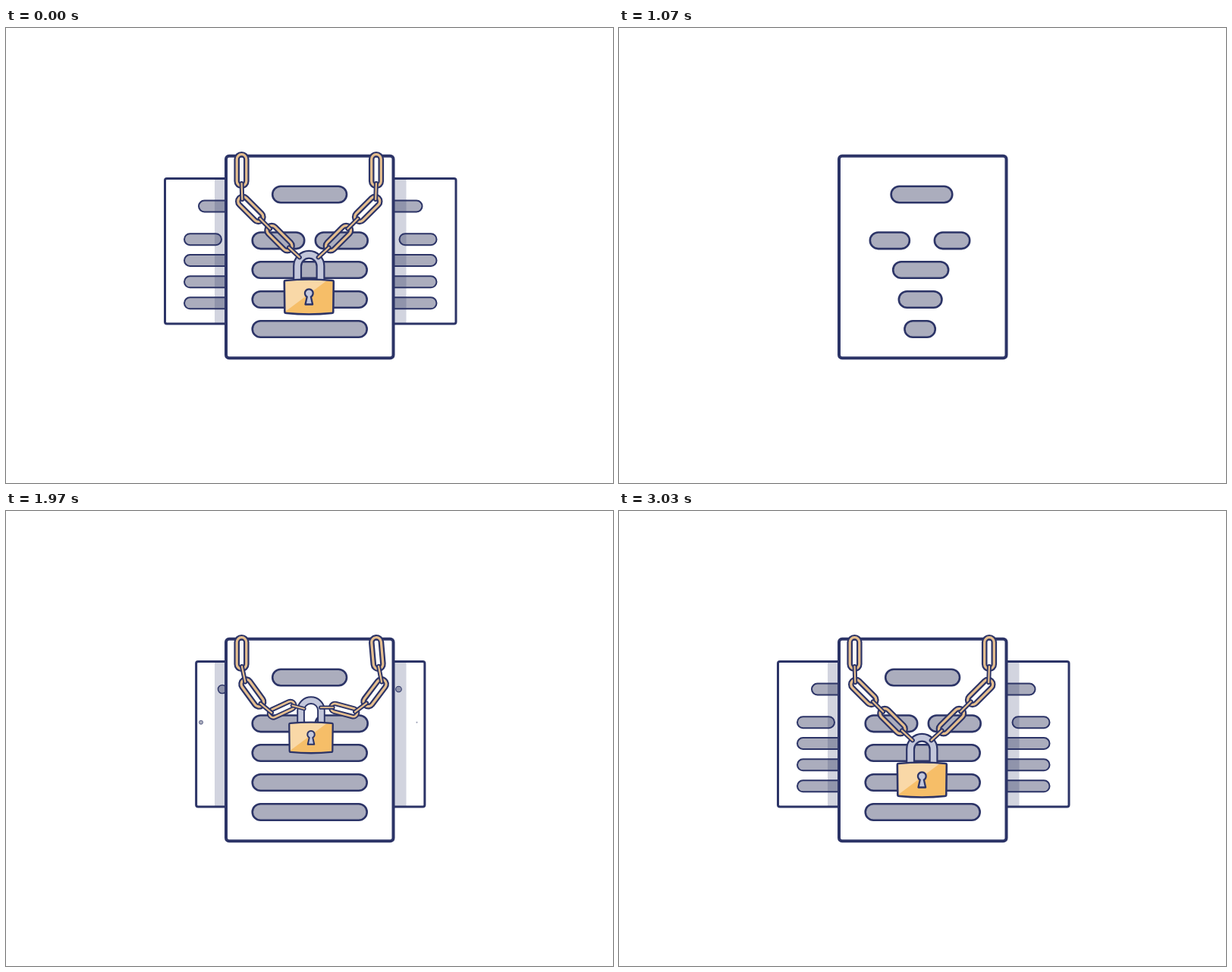
Recreate the animation shown at these times as an HTML page with a canvas. Size 800 by 600 pixels, loop 3530 ms.

```html
<!DOCTYPE html>
<html lang="en">
<head>
<meta charset="utf-8">
<title>Locked documents</title>
<style>
  html, body { margin: 0; width: 100%; height: 100%; overflow: hidden; background: #fff; }
  canvas { display: block; }
</style>
</head>
<body>
<canvas id="stage" width="800" height="600"></canvas>
<script>
const ctx = document.getElementById('stage').getContext('2d');
const LOOP = 3530;
const NAVY = '#2c3467', GREY = '#abadbd', GOLD = '#e5be8e', STEEL = '#c3c7db';

const clamp = v => Math.max(0, Math.min(1, v));
const part = (t, start, span) => clamp((t - start) / span);
const mix = (a, b, p) => a + (b - a) * p;
const smooth = p => (1 - Math.cos(Math.PI * p)) / 2;

function at(x, y, angle, scale, draw) {
  ctx.save();
  ctx.translate(x, y);
  ctx.rotate(angle * Math.PI / 180);
  ctx.scale(scale, scale);
  draw();
  ctx.restore();
}

function box(x0, y0, x1, y1, radius, fill, line) {
  ctx.beginPath();
  ctx.roundRect(x0, y0, x1 - x0, y1 - y0, radius);
  ctx.fillStyle = fill;
  ctx.fill();
  ctx.strokeStyle = NAVY;
  ctx.lineWidth = line;
  ctx.stroke();
}

// A dot pops up at c, then stretches to x0..x1.
function bar(t, x0, x1, y, c, r, line, start, popTime, growTime) {
  const pop = part(t, start - popTime, popTime);
  const p = part(t, start, growTime);
  if (!pop) return;
  at(c, y, 0, pop, () =>
    box(mix(-r, x0 - c, p), -r, mix(r, x1 - c, p), r, r, GREY, line));
}

function mainPage(t) {
  const pop = part(t, 50, 100);
  const tall = part(t, 150, 320);
  const wide = part(t, 470, 420);
  if (!pop) return;
  at(402.2, 302, 0, pop, () =>
    box(mix(-9, -112.2, wide), mix(-9, -133.3, tall),
        mix(9, 108.3, wide), mix(9, 133.2, tall), 4, '#fff', 4));
  const rows = [
    [351.2, 449, 219.5, 395],
    [324.7, 393.2, 280.3, 353],
    [407.8, 476.7, 280.3, 435.5],
    [324.7, 475.7, 319, 396],
    [324.7, 475.7, 358, 396],
    [324.7, 475.7, 397, 396]
  ];
  rows.forEach(([x0, x1, y, c], i) =>
    bar(t, x0, x1, y, c, 10.8, 2.6, 868 + i * 33, 80, 262));
}

function sidePage(t, delay, dotX) {
  const p = part(t, 1737, 485);
  if (!p) return;
  const left = mix(289, 209.5, p);
  box(left, 198.5, 320, 390, 2.5, '#fff', 3);
  const rows = [
    [254, 320, 235, 285],
    [235, 284, 278.7, dotX],
    [235, 320, 306.5, 286],
    [235, 320, 334.8, 286],
    [235, 320, 362.8, 286]
  ];
  rows.forEach(([x0, x1, y, c], i) =>
    bar(t, x0, x1, y, c, 7.5, 2, 2005 + delay + i * 52, 130, 440));
  const edge = Math.max(275, left);
  ctx.fillStyle = 'rgba(44,52,103,.21)';
  ctx.fillRect(edge, 198.5, 300 - edge, 191.5);
}

function mirrored(draw) {
  ctx.save();
  ctx.translate(802.5, 0);
  ctx.scale(-1, 1);
  draw();
  ctx.restore();
}

// Link angles from the anchor down, then the lock's x, y and tilt.
const RAISED = {
  left: [90, 78, 54, 40, -25, 15],
  right: [85, 79, 127, 143, 195, 180],
  lock: [402, 244.5, 0]
};
const REST = {
  left: [90, 88, 45, 45, 45, 43],
  right: [90, 92, 135, 135, 135, 137],
  lock: [399.3, 293, 0]
};
const SWUNG = {
  left: [90, 88, 45, 67, 45, 14],
  right: [90, 92, 135, 140, 138, 154],
  lock: [389, 282.7, -13.5]
};
const SWING = [[2150, 0], [2300, -.7], [2470, 1], [2640, -.5], [2800, .25], [2920, -.1], [3030, 0]];
const LENGTHS = [31, 25, 31, 23, 31, 23];
const STARTS = [1440, 1510, 1580, 1650, 1748, 1748];

function blend(a, b, p) {
  const out = {};
  for (const key in a) out[key] = a[key].map((v, i) => mix(v, b[key][i], p));
  return out;
}

function pose(t) {
  if (t < 2150) return blend(RAISED, REST, part(t, 1970, 180) ** 2);
  const i = SWING.findIndex(k => k[0] > t);
  if (i < 0) return REST;
  const [t0, a] = SWING[i - 1], [t1, b] = SWING[i];
  return blend(REST, SWUNG, mix(a, b, smooth((t - t0) / (t1 - t0))));
}

function twoTone(outer, inner) {
  ctx.lineCap = 'round';
  ctx.strokeStyle = NAVY;
  ctx.lineWidth = outer;
  ctx.stroke();
  ctx.strokeStyle = GOLD;
  ctx.lineWidth = inner;
  ctx.stroke();
}

function chain(t, x, y, angles) {
  const parts = angles.map((angle, i) => {
    const scale = part(t, STARTS[i], 260);
    const piece = { x, y, angle, scale, len: LENGTHS[i] };
    const rad = angle * Math.PI / 180;
    x += Math.cos(rad) * piece.len * scale;
    y += Math.sin(rad) * piece.len * scale;
    return piece;
  });
  for (const odd of [0, 1]) {
    parts.forEach(({ x, y, angle, scale, len }, i) => {
      if (i % 2 !== odd || !scale) return;
      at(x, y, angle, scale, () => {
        ctx.beginPath();
        if (odd) {
          ctx.moveTo(2, 0);
          ctx.lineTo(len - 2, 0);
          twoTone(6, 2.2);
        } else {
          ctx.roundRect(-5.3, -6.3, 41.6, 12.6, 6.3);
          twoTone(7.6, 3.2);
        }
      });
    });
  }
}

function shackle() {
  ctx.beginPath();
  ctx.moveTo(-15.2, 42);
  ctx.lineTo(-15.2, 21);
  ctx.arc(0, 21, 15.2, Math.PI, 0);
  ctx.lineTo(15.2, 42);
  ctx.lineCap = 'butt';
  ctx.strokeStyle = NAVY;
  ctx.lineWidth = 12;
  ctx.stroke();
  ctx.strokeStyle = STEEL;
  ctx.lineWidth = 7.6;
  ctx.stroke();
}

function lockBody() {
  const body = new Path2D('M-31 40Q0 37 31 40Q32.5 40 32.5 42L32 81Q32 83 30 83Q0 86 -30 83Q-32 83 -32 81L-32.5 42Q-32.5 40 -31 40Z');
  ctx.fillStyle = '#f6be68';
  ctx.fill(body);
  ctx.save();
  ctx.clip(body);
  ctx.fillStyle = '#f9d8a7';
  ctx.fill(new Path2D('M-34 36H29L-34 83Z'));
  ctx.restore();
  ctx.strokeStyle = NAVY;
  ctx.lineWidth = 2.6;
  ctx.lineJoin = 'round';
  ctx.stroke(body);
  const hole = new Path2D('M-2.6 61.5A5.4 5.4 0 1 1 2.6 61.5L4.8 71.5H-4.8Z');
  ctx.fillStyle = STEEL;
  ctx.fill(hole);
  ctx.lineWidth = 2.3;
  ctx.stroke(hole);
}

function draw(t) {
  ctx.fillStyle = '#fff';
  ctx.fillRect(0, 0, 800, 600);
  sidePage(t, 0, 257);
  mirrored(() => sidePage(t, 30, 261));
  mainPage(t);

  const { left, right, lock: [x, y, tilt] } = pose(t);
  const size = part(t, 1741, 260);
  if (size) at(x, y, tilt, size, shackle);
  chain(t, 310.5, 172, left);
  chain(t, 488, 172, right);
  if (size) at(x, y, tilt, size, lockBody);
}

const begin = performance.now();
function tick() {
  const t = (performance.now() - begin) % LOOP;
  // The finished picture flashes briefly before the build begins.
  draw(t < 30 ? LOOP : t);
  requestAnimationFrame(tick);
}
tick();
</script>
</body>
</html>
```
